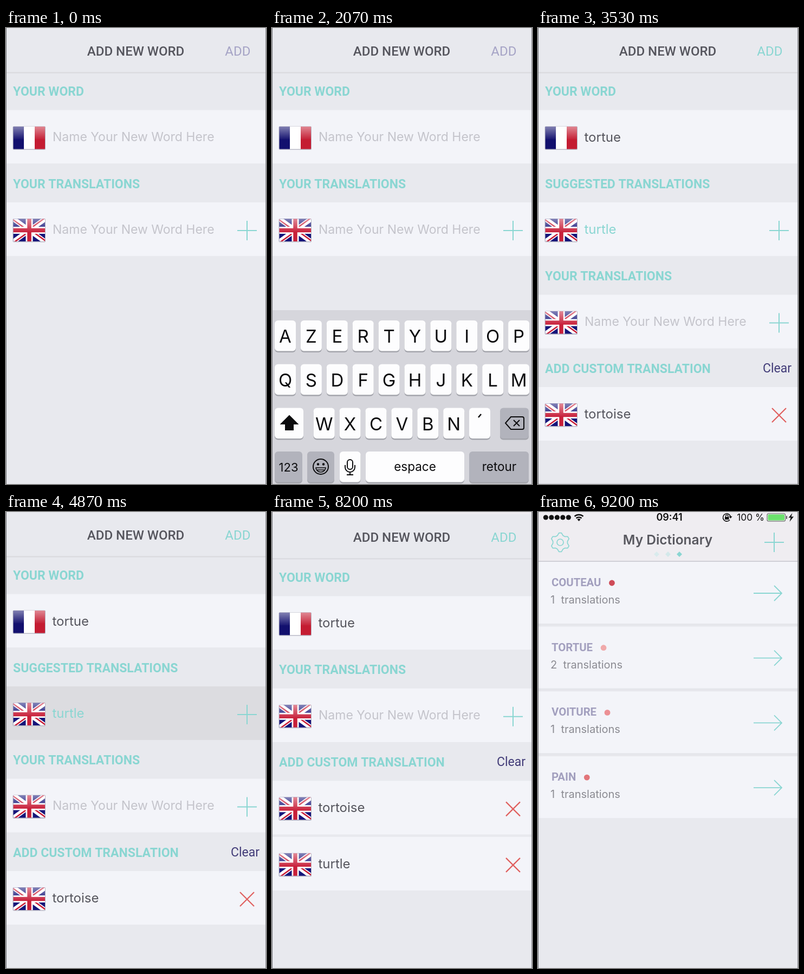
An HTML page with a canvas that plays this animation: 480 by 842 pixels, repeating every 9.27 s.

```html
<!DOCTYPE html>
<html lang="en">
<head>
<meta charset="utf-8">
<title>Add new word</title>
<style>
html, body { margin: 0; width: 100%; height: 100%; overflow: hidden; background: #e8e9ee; }
canvas { display: block; width: 480px; height: 842px; }
</style>
</head>
<body>
<canvas id="stage" width="480" height="842"></canvas>
<script>
const c = document.getElementById('stage').getContext('2d');
const LOOP = 9270, W = 480, H = 842;
const TEAL = '#8ad6d2', PAGE = '#e8e9ee', ROW = '#f3f4f9', INK = '#55555d', RED = '#e0605f', LILAC = '#a6a4c6';
const FOCUS = 1100, TYPE = 2200, PICK = 3050, PRESS = 4780, MOVE = 5030, DISMISS = 8192;
const SECTION = 170.5, ROW_GAP = 103.5, LIST = 198;
const inter = (size, weight = 400) => `${weight} ${size}px Inter, sans-serif`;
const roboto = (size, weight = 400) => `${weight} ${size}px Roboto, sans-serif`;

// Motion
const ramp = (t, from, length) => {
  const p = Math.min(1, Math.max(0, (t - from) / length));
  return p * p * (3 - 2 * p);
};
const spring = (t, from, rate) => {
  const x = Math.max(0, t - from) * rate / 1000;
  return 1 - (1 + x) * Math.exp(-x);
};

// Drawing helpers
function text(s, x, y, font, color, align = 'left') {
  c.font = font;
  c.fillStyle = color;
  c.textAlign = align;
  c.fillText(s, x, y);
  return c.measureText(s).width;
}
function rect(x, y, w, h, color) {
  c.fillStyle = color;
  c.fillRect(x, y, w, h);
}
function round(x, y, w, h, r, color) {
  c.beginPath();
  c.roundRect(x, y, w, h, r);
  c.fillStyle = color;
  c.fill();
}
function disc(x, y, r, color) {
  c.beginPath();
  c.arc(x, y, r, 0, 7);
  c.fillStyle = color;
  c.fill();
}
function pen(d, color, width = 2) {
  c.strokeStyle = color;
  c.lineWidth = width;
  c.stroke(new Path2D(d));
}
function shape(d, color) {
  c.fillStyle = color;
  c.fill(new Path2D(d));
}
function at(x, y, alpha, draw) {
  if (alpha <= 0) return;
  c.save();
  c.translate(x, y);
  c.globalAlpha *= alpha;
  draw();
  c.restore();
}
const plus = (x, y) => pen(`M${x - 18} ${y}h36M${x} ${y - 18}v36`, TEAL);
const cross = (x, y) => pen(`M${x - 13} ${y - 13}l26 26m0-26l-26 26`, RED, 2.2);

function flag(y, british) {
  at(13, y, 1, () => {
    round(-.5, 0, 60.5, 43.5, 2, '#b9b9c6');
    c.beginPath();
    c.roundRect(.5, .5, 58.5, 41.5, 1);
    c.clip();
    if (british) {
      rect(0, 0, 60, 43, '#15157a');
      pen('M0 0L60 43M60 0L0 43', '#fff', 9);
      pen('M0 2L30 23.5L0 45M60 -2L30 19.5L60 41', '#c8203a', 2.6);
      pen('M30 0V43M0 21.5H60', '#fff', 13);
      pen('M30 0V43M0 21.5H60', '#c8203a', 7.5);
    } else {
      rect(0, 0, 20, 43, '#12106e');
      rect(20, 0, 20, 43, '#fff');
      rect(40, 0, 20, 43, '#c41c32');
    }
    const gloss = c.createLinearGradient(0, 0, 0, 24);
    gloss.addColorStop(0, 'rgba(255,255,255,.48)');
    gloss.addColorStop(1, 'rgba(255,255,255,.03)');
    rect(0, 0, 60, 24, gloss);
  });
}

// Form
function heading(s, top) {
  rect(0, top, W, 72, PAGE);
  text(s, 13, top + 45, roboto(23, 600), TEAL);
}
function row(top, word, icon, { british = true, color = INK, fill = ROW, height = 99 } = {}) {
  rect(0, top, W, height, fill);
  flag(top + 30, british);
  if (word) text(word, 85.5, top + 58, inter(24), color);
  else text('Name Your New Word Here', 86, top + 57.5, inter(23), '#c4c4cb');
  if (icon) icon(445, top + 52);
}

function form(t) {
  const list = ramp(t, TYPE + 50, 300) - ramp(t, PICK, 300);
  const suggest = ramp(t, TYPE + 50, 300) - ramp(t, MOVE, 300);
  const custom = ramp(t, PICK, 300);
  const added = ramp(t, MOVE, 300);
  const chosen = t >= PICK;
  const word = chosen ? 'tortue' : t >= TYPE ? 'T' : '';
  const suggestTop = 250.5 + LIST * list;
  const yoursTop = suggestTop + SECTION * suggest;
  const customTop = yoursTop + SECTION;

  rect(0, 0, W, H, PAGE);
  text('ADD NEW WORD', 239.5, 51, roboto(24, 500), INK, 'center');
  text('ADD', 451.5, 51, roboto(24), chosen ? TEAL : LILAC, 'right');
  rect(0, 81.5, W, 2, '#d9d9de');
  text('YOUR WORD', 13, 125, roboto(23, 600), TEAL);
  row(151.5, word, null, { british: false });
  if (t >= FOCUS && t < PICK) {
    const blink = t < TYPE ? (t - FOCUS) % 1000 < 550 : (t - TYPE) % 1000 < 500;
    c.font = inter(24);
    if (blink) rect(85.5 + c.measureText(word).width, 185, 2.5, 30, TEAL);
  }

  at(0, suggestTop, suggest, () => {
    const pressed = t >= PRESS && t < MOVE + 150;
    heading('SUGGESTED TRANSLATIONS', 0);
    row(71.5, 'turtle', plus, { color: TEAL, fill: pressed ? '#dcdce0' : ROW, height: pressed ? 102 : 99 });
  });
  at(0, customTop, custom, () => {
    heading('ADD CUSTOM TRANSLATION', 0);
    text('Clear', 468, 44.5, roboto(23), '#423c78', 'right');
    row(71.5, 'tortoise', cross);
    at(0, 71.5 + ROW_GAP, added, () => row(0, 'turtle', cross));
  });
  heading('YOUR TRANSLATIONS', yoursTop);
  row(yoursTop + 71.5, '', plus);

  if (list > 0) {
    c.save();
    c.beginPath();
    c.rect(0, 254, W, LIST * list);
    c.clip();
    rect(0, 254, W, LIST, '#8dd6d3');
    ['tire-bouchon', 'tigre', 'tortue'].forEach((s, i) => {
      const y = 295 + 66 * i;
      shape(`M23 ${y - 20}l29 13l-29 13z`, '#f3f6f9');
      text('You already entered:', 65, y, roboto(24.8), '#eff9fa');
      text(s, 303, y, roboto(24.8, 700), '#fff');
    });
    c.restore();
  }
}

// Keyboard
function key(x, y, w, color = '#fdfdfe') {
  round(x, y + 2, w, 57, 6, '#a4a5ac');
  round(x, y, w, 56.5, 6, color);
}
function keyboard(t) {
  const shown = spring(t, FOCUS, 16) - spring(t, PICK, 16);
  if (shown < .002) return;
  const upper = t < TYPE + 50, grey = '#b2b3bc', black = '#0c0c0e';
  at(0, 521 + 321 * (1 - shown), 1, () => {
    rect(0, 0, W, 321, '#d6d6dc');
    ['azertyuiop', 'qsdfghjklm', 'wxcvbn'].forEach((letters, r) => {
      [...letters].forEach((l, i) => {
        const x = (r === 2 ? 76.7 : 5) + 47.9 * i, y = 19 + 80.8 * r;
        key(x, y, 39);
        text(upper ? l.toUpperCase() : l, x + 19.5, y + (upper ? 41 : 37), inter(upper ? 33 : 35), black, 'center');
      });
    });
    key(364, 180.5, 39);
    pen(upper ? 'M386 192l-5 6' : 'M385 196l-3 7', black, 2.6);

    key(5, 180.5, 53, upper ? '#fdfdfe' : grey);
    const shift = 'M32 195l15 15h-8v11h-14v-11h-8z';
    if (upper) shape(shift, black);
    pen(shift, black, 2);
    key(421, 180.5, 53, grey);
    pen('M441 197h21q3 0 3 3v17q0 3-3 3h-21l-10-11.500zM446 203l11 11m0-11l-11 11', black, 2);

    key(5, 261, 51, grey);
    text('123', 30.5, 298, inter(22), black, 'center');
    key(65, 261, 50, grey);
    c.beginPath();
    c.arc(90, 289, 14, 0, 7);
    c.strokeStyle = black;
    c.lineWidth = 2;
    c.stroke();
    disc(85, 284.5, 2.2, black);
    disc(95, 284.5, 2.2, black);
    pen('M81 291h18a9 8 0 0 1-18 0zM83 295h14', black, 1.6);
    key(125, 261, 38.5);
    pen('M139 281a5 5 0 0 1 10 0v8a5 5 0 0 1-10 0zM135 286v4a9 9 0 0 0 18 0v-4M144 299v5M138 304h12', black, 2);
    key(173, 261, 182);
    text('espace', 264, 296.5, inter(22.5), black, 'center');
    key(364, 261, 110, grey);
    text('retour', 419.5, 296.5, inter(22.5), black, 'center');

    if (t >= TYPE - 70 && t < TYPE + 40) {
      round(185, -60, 63, 72, 10, '#fdfdfe');
      shape('M186 2C186 16 196.600 18 196.600 30V72Q197 76 201 76H231Q235.600 76 235.600 72V30C235.600 18 248 16 248 2z', '#fdfdfe');
      text('T', 216, -8, inter(44), black, 'center');
    }
  });
}

// Dictionary
function statusBar() {
  const black = '#111';
  for (let i = 0; i < 5; i++) disc(14.3 + 10.5 * i, 10, 4.6, black);
  pen('M67.500 8a12 12 0 0 1 16 0M70.500 11.500a7.500 7.500 0 0 1 10 0', black, 2.4);
  shape('M75.500 17l-3-3.300a4.500 4.500 0 0 1 6 0z', black);
  text('09:41', 242.5, 16, inter(18, 600), black, 'center');
  pen('M354 14.500a7 7 0 1 1 1.500-5', black, 1.6);
  shape('M352.500 8h6l-3 4z', black);
  rect(345, 9, 7.5, 5, black);
  pen('M346.500 9v-1.500a2.200 2.200 0 0 1 4.400 0v1.500', black, 1.3);
  text('100 %', 418, 16, inter(17.3), black, 'right');
  round(422.5, 2.5, 34.5, 15, 3, '#555');
  round(423.5, 3.5, 32.5, 13, 2, '#f2f2f4');
  round(424.5, 4.5, 30.5, 11, 1.5, '#6be26c');
  round(458, 7, 2, 6, 1, '#555');
  shape('M469.500 2l-7 8.500h4l-2 7.500l7.500-9.500h-4.500z', black);
}
function gear(x, y) {
  let d = '';
  for (let i = 0; i < 24; i++) {
    const a = (i - .5) * Math.PI / 12 - Math.PI / 2;
    const r = i % 4 < 2 ? 17.5 : 13.5;
    d += `${i ? 'L' : 'M'}${x + r * Math.cos(a)} ${y + r * Math.sin(a)}`;
  }
  c.lineJoin = 'round';
  pen(d + `zM${x + 6} ${y}a6 6 0 1 0-12 0a6 6 0 1 0 12 0`, TEAL, 1.7);
  c.lineJoin = 'miter';
}
function dictionary(t) {
  rect(0, 0, W, H, PAGE);
  rect(0, 0, W, 90, '#efedf1');
  rect(0, 90, W, 2, '#d0cfd6');
  at(0, 0, ramp(t, DISMISS + 50, 300), statusBar);
  gear(41, 56);
  plus(436, 56);
  text('My Dictionary', 239.5, 60, inter(24.5, 600), '#58585f', 'center');
  ['#d9ebed', '#d3e8ea', TEAL].forEach((color, i) => shape(`M${219 + 21 * i} 73l5 5l-5 5l-5-5z`, color));
  const entries = [['COUTEAU', 1, '#cf4b58'], ['TORTUE', 2, '#f0a9aa'], ['VOITURE', 1, '#ec9094'], ['PAIN', 1, '#e2757a']];
  entries.forEach(([name, count, color], i) => at(0, 92 + 119.7 * i, 1, () => {
    rect(0, 0, W, 114, ROW);
    if (i < 3) rect(0, 114, W, 4, '#e5e6eb');
    const w = text(name, 25, 45, roboto(20.3, 700), '#a29fbe');
    disc(45 + w, 39, 5.4, color);
    text(`${count}  translations`, 23, 77, inter(20), '#8b8b92');
    pen('M398 58h52M436 44l14 14l-14 14', TEAL, 1.8);
  }));
}

function frame() {
  const t = performance.now() % LOOP;
  c.clearRect(0, 0, W, H);
  if (t >= DISMISS) dictionary(t);
  at(0, H * spring(t, DISMISS, 11), 1, () => {
    form(t);
    keyboard(t);
  });
  rect(0, 0, 1, H, '#77777c');
  rect(479, 0, 1, H, '#8d8d93');
  requestAnimationFrame(frame);
}
frame();
</script>
</body>
</html>
```
